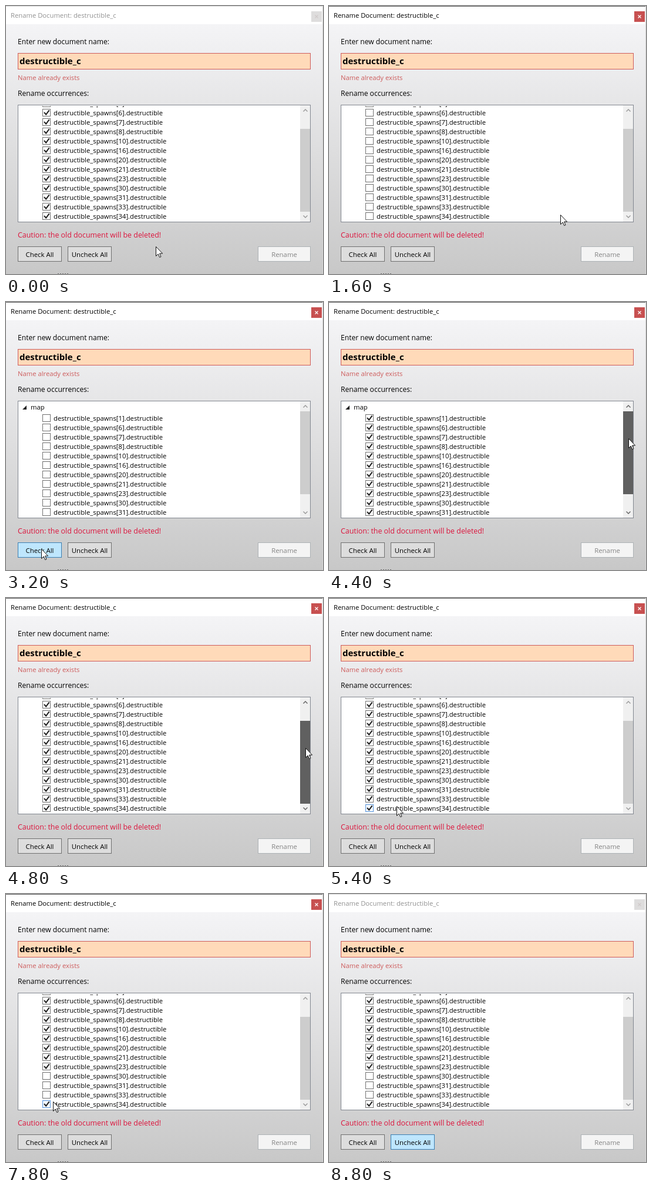
An HTML page that plays this animation: 540 by 456 pixels, repeating every 9 s.

```html
<!DOCTYPE html>
<html lang="en">
<head>
<meta charset="utf-8">
<title>Rename Document</title>
<style>
  html, body { margin: 0; width: 100%; height: 100%; overflow: hidden; background: #fff; }
  svg { display: block; width: 100%; height: 100%; cursor: default; }
  text { font-family: "Open Sans", "Noto Sans", sans-serif; font-size: 11.25px; white-space: pre; }
  .label { font-size: 12.1px; }
  .input { font-size: 15px; font-weight: 700; }
  .warn { font-size: 12.4px; }
  .button { font-size: 11.4px; text-anchor: middle; }
</style>
</head>
<body>
<svg id="stage" viewBox="0 0 540 456">
  <defs>
    <linearGradient id="shade" x1="0" y1="0" x2="0" y2="1">
      <stop offset="0" stop-color="#f4f4f6"/>
      <stop offset="1" stop-color="#c8c8c8"/>
    </linearGradient>
    <clipPath id="view"><rect x="21" y="170" width="480" height="197"/></clipPath>
  </defs>
</svg>
<script>
const LOOP = 9000, STEP = 200, ROW = 16, SCROLL_MAX = 32, THUMB_TRAVEL = 23;
const FOCUS = 800, UNCHECK = 1000, DRAG_UP = 2000, CHECK = 3400, DRAG_DOWN = 4400;
const DRAG_TIME = 400, TOGGLE = 6400, TOGGLE_GAP = 600, BLUR = 8600;
const stage = document.getElementById('stage');

function set(el, attrs) {
  for (const k in attrs) el.setAttribute(k, attrs[k]);
  return el;
}
function add(tag, attrs, parent = stage) {
  const el = document.createElementNS('http://www.w3.org/2000/svg', tag);
  return parent.appendChild(set(el, attrs));
}
function rect(x, y, width, height, fill) {
  return add('rect', { x, y, width, height, fill });
}
function box(x, y, w, h, fill, stroke, parent) {
  return add('rect', { x: x + .5, y: y + .5, width: w - 1, height: h - 1, fill, stroke }, parent);
}
function text(str, x, y, fill = '#000', cls = '', parent) {
  const el = add('text', { x, y, fill, class: cls }, parent);
  el.textContent = str;
  return el;
}
function line(d, stroke, width, parent) {
  return add('path', { d, stroke, 'stroke-width': width, fill: 'none' }, parent);
}
function button(str, x, w, fill, stroke, color) {
  const frame = box(x, 409, w, 26, fill, stroke);
  text(str, x + w / 2, 427, color, 'button');
  return { frame, x, w };
}

// Window
rect(0, 0, 540, 31, '#fff');
rect(0, 31, 540, 425, 'url(#shade)');
const topEdge = rect(0, 0, 539, 1, '#555');
rect(539, 0, 1, 456, '#d8d8d8');
for (let x = 88; x < 108; x += 4) rect(x, 455, 2, 1, '#666');
const title = text('Rename Document: destructible_c', 8, 20);
const closeBox = rect(520, 9, 18, 18, '#c75050');
const closeMark = line('M526.5 15.5l5 5m0 -5l-5 5', '#fff', 1.3);

// Form
text('Enter new document name:', 20, 65, '#000', 'label');
box(20, 80, 499, 28, '#ffdab9', '#cd5c5c');
text('destructible_c', 23, 99, '#000', 'input');
text('Name already exists', 20, 126, '#cd5c5c');
text('Rename occurrences:', 20, 153, '#000', 'label');
box(20, 168, 499, 200, '#fff', '#828790');
text('Caution: the old document will be deleted!', 20, 394, '#dc143c', 'warn');
const checkAll = button('Check All', 20, 75, '#ddd', '#707070', '#000');
const uncheckAll = button('Uncheck All', 105, 75, '#ddd', '#707070', '#000');
button('Rename', 429, 90, '#f4f4f4', '#adb2b5', '#838383');

// Tree
const view = add('g', { 'clip-path': 'url(#view)' });
const tree = add('g', {}, view);
add('path', { d: 'M35 176v7h-7z', fill: '#222' }, tree);
text('map', 42, 183, '#000', '', tree);
const rows = [1, 6, 7, 8, 10, 16, 20, 21, 23, 30, 31, 33, 34].map((id, i) => {
  const y = 198 + i * ROW;
  const frame = box(62, y - 7, 14, 13, '#fff', '#707070', tree);
  const tick = line(`M65 ${y - 1}l3.2 3.7 5.4 -7.4`, '#212121', 2, tree);
  text(`destructible_spawns[${id}].destructible`, 81, y + 4, '#000', '', tree);
  return { y, frame, tick };
});
const toggled = rows.slice(9, 12);

// Scrollbar
rect(501, 169, 17, 198, '#f0f0f0');
const thumb = rect(501, 186, 17, 141, '#cdcdcd');
const arrows = [
  line('M506.5 179.5l3.5 -3.5 3.5 3.5', '#999', 1.4),
  line('M506.5 356.5l3.5 3.5 3.5 -3.5', '#999', 1.4)
];

const pointer = add('path', {
  d: 'M-.5 .5V16.5L3.2 13 5.7 18.6 8 17.6 5.6 12.1H10.6Z',
  fill: '#fff', stroke: '#111'
});

// Pointer stops: where it arrives, when, and when it leaves
const stop = (x, y, at, leave = at) => ({ x, y, at, leave });
const stops = [
  stop(256, 409, 0),
  stop(142, 420, FOCUS, UNCHECK),
  stop(395, 355, 1600),
  stop(511, 232 + THUMB_TRAVEL, DRAG_UP),
  stop(511, 232, DRAG_UP + DRAG_TIME),
  stop(61, 420, 3200, CHECK + STEP),
  stop(511, 232, DRAG_DOWN),
  stop(511, 232 + THUMB_TRAVEL, DRAG_DOWN + DRAG_TIME),
  stop(116, 354, 5400),
  ...toggled.map((r, i) => {
    const click = TOGGLE + i * TOGGLE_GAP;
    return stop(68, r.y - SCROLL_MAX - 1, click - STEP, click);
  }),
  stop(150, 415, BLUR - STEP, LOOP)
];

const within = (v, a, b) => v >= a && v <= b;
function ramp(t, a, b) {
  const p = Math.min(1, Math.max(0, (t - a) / (b - a)));
  return p * p * (3 - 2 * p);
}
function pointerAt(t) {
  const i = stops.findIndex(s => t < s.at);
  if (i < 0) return stops[stops.length - 1];
  const a = stops[i - 1], b = stops[i], p = ramp(t, a.leave, b.at);
  return { x: a.x + (b.x - a.x) * p, y: a.y + (b.y - a.y) * p };
}

function paintButton(b, x, y, pressed) {
  const hot = within(x, b.x, b.x + b.w) && within(y, 409, 435);
  set(b.frame, {
    fill: hot ? (pressed ? '#c4e5f6' : '#bee6fd') : '#ddd',
    stroke: hot ? (pressed ? '#2c628b' : '#3c7fb1') : '#707070'
  });
}

function draw(t) {
  const active = t >= FOCUS && t < BLUR;
  const shown = t < BLUR;
  const { x, y } = pointerAt(t);
  const scrolled = 1 - ramp(t, DRAG_UP, DRAG_UP + DRAG_TIME) + ramp(t, DRAG_DOWN, DRAG_DOWN + DRAG_TIME);
  const scroll = SCROLL_MAX * scrolled;
  const drag = [DRAG_UP, DRAG_DOWN].some(d => within(t, d, d + DRAG_TIME));
  const overBar = within(x, 501, 518) && within(y, 169, 367);

  set(topEdge, { fill: active ? '#555' : '#d8d8d8' });
  set(title, { fill: active ? '#000' : '#929292' });
  set(closeBox, { fill: active ? '#c75050' : '#dedddd' });
  set(closeMark, { stroke: active ? '#fff' : '#d0caca' });

  paintButton(checkAll, x, y, t === CHECK);
  paintButton(uncheckAll, x, y, t === FOCUS);

  set(tree, { transform: `translate(0 ${-Math.round(scroll)})` });
  const all = t < UNCHECK || t >= CHECK;
  for (const r of rows) {
    const hot = shown && within(x, 62, 272) && within(y, 170, 367) && Math.abs(y + scroll - r.y) < ROW / 2;
    const n = toggled.indexOf(r);
    const off = n >= 0 && t >= TOGGLE + n * TOGGLE_GAP;
    set(r.frame, { fill: hot ? '#f3f9ff' : '#fff', stroke: hot ? '#5593dd' : '#707070' });
    set(r.tick, { visibility: all && !off ? 'visible' : 'hidden' });
  }

  set(thumb, {
    y: 186 + Math.round(THUMB_TRAVEL * scrolled),
    fill: drag ? '#606060' : overBar ? '#a6a6a6' : '#cdcdcd'
  });
  for (const a of arrows) set(a, { stroke: overBar ? '#606060' : '#999' });

  set(pointer, {
    transform: `translate(${Math.round(x)} ${Math.round(y)})`,
    visibility: shown ? 'visible' : 'hidden'
  });
}

const start = performance.now();
function tick(now) {
  const t = Math.max(0, now - start) % LOOP;
  draw(Math.floor(t / STEP) * STEP);
  requestAnimationFrame(tick);
}
draw(0);
requestAnimationFrame(tick);
</script>
</body>
</html>
```
